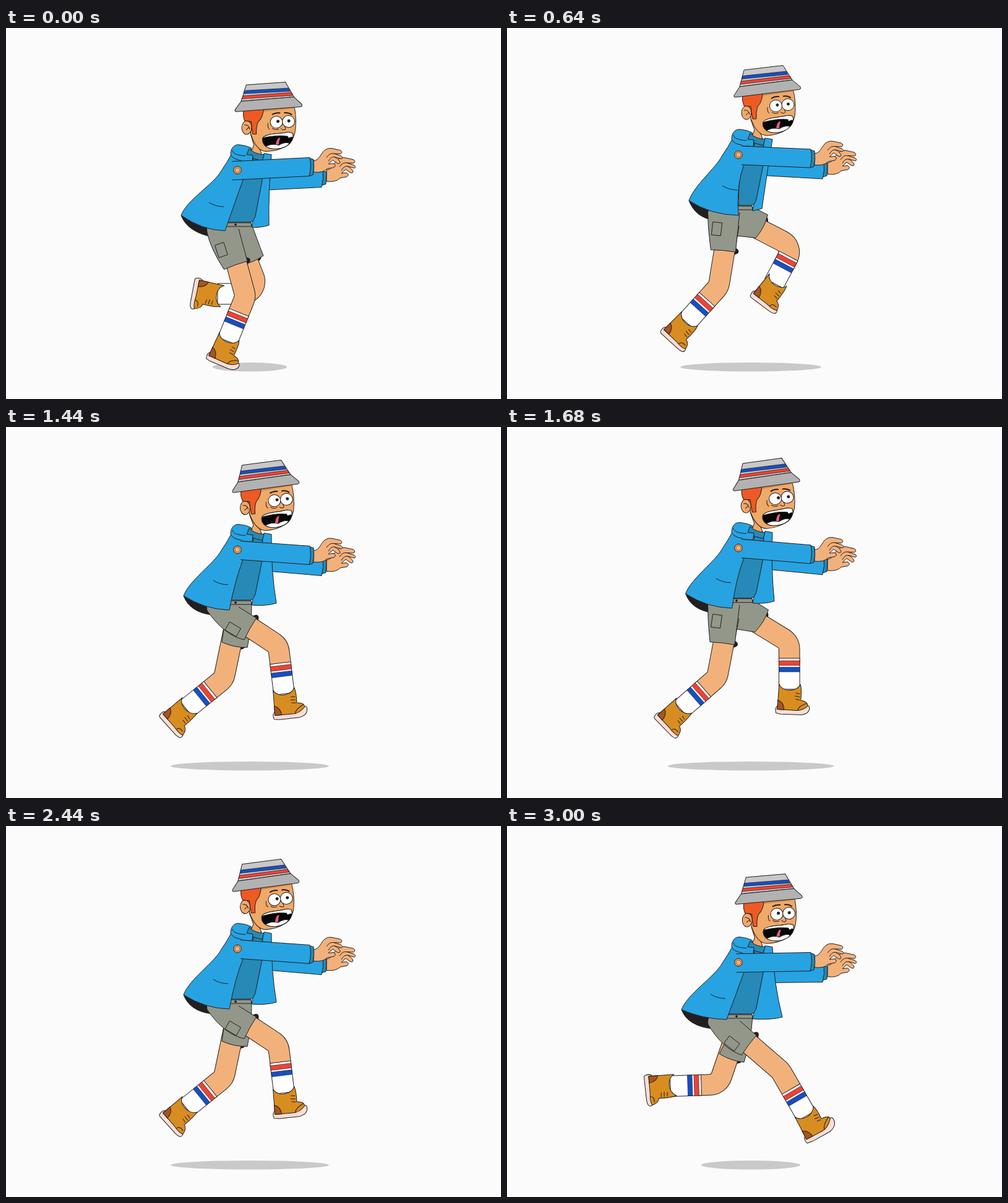
Animation of 800 by 600 pixels, one loop 3.04 s. Source, as an HTML page with a canvas:

```html
<!DOCTYPE html>
<html lang="en">
<head>
<meta charset="utf-8">
<title>Running man</title>
<style>
html, body { margin: 0; width: 100%; height: 100%; overflow: hidden; background: #fbfbfb; }
canvas { display: block; width: 800px; height: 600px; }
</style>
</head>
<body>
<canvas id="stage" width="800" height="600"></canvas>
<script>
const ctx = document.getElementById('stage').getContext('2d');
const LOOP = 3040, STEP = 40, STRIDE = 12.5;
const INK = '#231f20', BLUE = '#27a3e2', TEAL = '#2789b7', SKIN = '#f2b17b', FACE = '#efa969',
  CLOTH = '#92978a', RED = '#ee4236', ROYAL = '#174fc0', SHOE = '#d88d20', SOLE = '#f6ded6';

// phase, knee x, knee y (from the hip), shin angle, foot angle, shin length, toe lift
const LEG = [
  [0, 27, 99, -22, 0, 1, .6],
  [.2, -18, 110, -42, 0, 1, 0],
  [.3, -22, 106, -51, -4, 1, 0],
  [.34, -35, 100, -60, 0, 1, 0],
  [.38, -51, 92, -75, -2, 1, 0],
  [.42, -32, 93, -88, -5, 1, 0],
  [.5, 37, 95, -90, 10, .88, 0],
  [.7, 89, 46, -28, 8, .85, 0],
  [.8, 80, 53, 7, 0, 1, .8],
  [.84, 80, 62, 19, 0, 1, 1],
  [.92, 82, 71, 30, 0, 1.08, 1]
];
// phase, drop of the body
const BOB = [[0, 27], [.04, 27], [.12, 17], [.2, 0], [.27, -10.5], [.3, -7], [.34, 0], [.42, 17]];
// phase, back hem x, y, front hem x, y, far flap x
const COAT = [
  [0, 283, 276, 354, 301, 425],
  [.2, 294, 279, 374, 303, 412],
  [.3, 287, 280, 361, 303, 437],
  [.34, 285, 280, 360, 300, 439],
  [.42, 282, 280, 355, 296, 445]
];

// Smooth periodic curve through the keys
function curve(keys, period, phase) {
  const n = keys.length;
  const p = ((phase % period) + period) % period;
  const at = i => keys[(i + n) % n];
  const time = i => at(i)[0] + Math.floor(i / n) * period;
  let i = n - 1;
  while (keys[i][0] > p) i--;
  const h = time(i + 1) - time(i), s = (p - time(i)) / h;
  const slope = (j, k) => (at(j + 1)[k] - at(j - 1)[k]) / (time(j + 1) - time(j - 1));
  return at(i).slice(1).map((a, c) => {
    const k = c + 1, b = at(i + 1)[k], d = b - a;
    const m0 = slope(i, k) * h, m1 = slope(i + 1, k) * h;
    return a + s * (m0 + s * (3 * d - 2 * m0 - m1 + s * (m0 + m1 - 2 * d)));
  });
}

function shape(d, fill, stroke = INK, width = 1) {
  const path = new Path2D(d);
  if (fill) { ctx.fillStyle = fill; ctx.fill(path); }
  if (stroke) { ctx.strokeStyle = stroke; ctx.lineWidth = width; ctx.stroke(path); }
}
const line = (d, width) => shape(d, null, INK, width);

function oval(x, y, rx, ry, fill, stroke = INK, tilt = 0) {
  ctx.beginPath();
  ctx.ellipse(x, y, rx, ry, tilt, 0, 2 * Math.PI);
  ctx.fillStyle = fill;
  ctx.fill();
  if (stroke) { ctx.strokeStyle = stroke; ctx.lineWidth = 1; ctx.stroke(); }
}

function group(draw) {
  ctx.save();
  draw();
  ctx.restore();
}

function pose(phase, x, y) {
  const [kx, ky, shin, foot, len, toe] = curve(LEG, 1, phase);
  const r = Math.hypot(kx, ky), u = [kx / r, ky / r], n = [u[1], -u[0]];
  const on = (a, b) => [x + a * u[0] + b * n[0], y + a * u[1] + b * n[1]];
  const hem = 54 - .13 * Math.max(0, kx);
  return { x, y, knee: [x + kx, y + ky], shin: shin * Math.PI / 180, foot: foot * Math.PI / 180, len, toe, hem, on, n };
}

function shoe(toe) {
  const tx = 28 + 6 * toe, ty = 36 - 10 * toe;
  shape(`M-18 30 Q-24 33 -21 42 L${-19 + 8 * toe} 43.500 L${18 + 2 * toe} 44 Q${tx + 2} ${44 - 3 * toe} ${tx + 1} ${ty + 2}
    Q${tx} ${ty - 2} ${tx - 5} ${ty} Z`, SOLE);
  shape(`M-17 -5 C-12 8 11 8 17.500 -5 Q20 4 18.500 ${24 - 5 * toe} Q${tx - 2} ${25 - 5 * toe} ${tx - 3 * toe} ${ty}
    Q${22 - 2 * toe} ${39 - toe} 9 37 L-19 36 Q-18 14 -17 -5 Z`, SHOE);
  shape('M-18.500 21 Q-9 24 -8 36.500 L-19 36 Z', '#a8551b');
  line(`M14 37 Q15 30 ${tx - 4} ${ty - 4}`);
  line('M10 9 L17 10 M9 14 L17 15 M10 19 L17 20');
}

function leg(p) {
  const [kx, ky] = p.knee, dx = Math.sin(p.shin), dy = Math.cos(p.shin);
  const hem = p.on(p.hem - 3, 3);
  oval(hem[0], hem[1], 20, 8, INK, null, Math.atan2(p.n[1], p.n[0]));
  for (const [color, width] of [[INK, 34.6], [SKIN, 32.6]]) {
    ctx.beginPath();
    ctx.moveTo(p.x, p.y);
    ctx.arcTo(kx, ky, kx + 34 * dx, ky + 34 * dy, 20);
    ctx.lineTo(kx + 34 * dx, ky + 34 * dy);
    ctx.strokeStyle = color;
    ctx.lineWidth = width;
    ctx.stroke();
  }
  group(() => {
    ctx.translate(kx, ky);
    ctx.rotate(-p.shin);
    ctx.translate(0, 75 * (p.len - 1));
    shape('M-16.8 28 H16.8 V78 H-16.8 Z', '#fff');
    shape('M-16.8 32 H16.8 V39.5 H-16.8 Z', RED, INK, .6);
    shape('M-16.8 42.5 H16.8 V50 H-16.8 Z', ROYAL, INK, .6);
    ctx.translate(0, 90);
    ctx.rotate(p.foot);
    ctx.translate(0, -15);
    shoe(p.toe);
  });
}

function farShorts(p) {
  const y = p.y, back = p.on(p.hem - 3, -15), front = p.on(p.hem - 3, 27);
  shape(`M340 ${y - 18} L352 ${y + 26} L${back} Q${p.on(p.hem + 2, 6)} ${front}
    Q${p.on(16, 27)} 397 ${y - 18} Z`, CLOTH);
}

function nearShorts(p) {
  const y = p.y, back = p.on(p.hem + 1, -22), front = p.on(p.hem - 2, 18);
  shape(`M333 ${y - 22} H397 L390 ${y + 8} L375 ${y + 12} Z`, CLOTH, null);
  shape(`M333 ${y - 24} Q322 ${y - 14} 325 ${y - 4} Q${p.on(14, -34)} ${back}
    Q${p.on(p.hem - 2, -2)} ${front} L376 ${y - 10}`, CLOTH);
  line(`M${p.on(10, -26)} L${p.on(9, -11)} L${p.on(30, -10)} L${p.on(31, -25)} Z`);
  shape(`M345 ${y - 20} H396 L397 ${y - 14} H345 Z`, CLOTH);
  oval(371, y - 17, 1.4, 1.4, INK);
}

function hand(x, y) {
  group(() => {
    ctx.translate(x, y);
    shape(`M497 203 C506 203 509 191 515 186 Q520 182 526 183 L540 186 Q545 189 541 192 L530 191.500
      L541 195 Q546 198 542 200 L531 197 Q539 201 540 206 Q539 209 535 207 L528 202 L521 208.500
      L529 207.500 Q535 210 530 214 L519 216 Q513 223 497 221.500 Z`, SKIN);
    line('M518 198 Q523 190 530 191.500 M521 204 Q525 196 531 197');
  });
}

function farArm(up, dy) {
  const w = dy * .5;
  hand(21, 15 + dy * .43);
  shape(`M511 ${218 + w} L518 ${219 + w} L517 ${239 + w} L510 ${241 + w} Z`, TEAL);
  shape(`M405 ${208 + up} L512 ${216 + w} Q514 ${230 + w} 510 ${244 + w} L405 ${238 + up} Z`, BLUE);
}

function nearArm(up, dy) {
  const w = dy * .5, x = 379 - Math.max(0, dy) * .5;
  hand(0, dy * .43);
  shape(`M490 ${197 + w} L497 ${199 + w} Q499 ${212 + w} 496 ${224 + w} L490 ${226 + w} Z`, TEAL);
  const top = `${x} ${191 + up} L491 ${196 + w}`;
  const low = `490 ${226 + w} L${x} ${221 + up}`;
  shape(`M${top} Q494 ${211 + w} ${low} Z`, BLUE, null);
  line(`M${top} Q494 ${211 + w} ${low}`);
  oval(374, 205 + up, 6.3, 6.3, '#f3a764');
  oval(374, 205 + up, 4, 4, '#f5b57c', '#a8551b');
}

function lining(c, dy) {
  const [bx, by] = c;
  shape(`M${bx} ${by + dy} Q${bx + 10} ${by + dy + 27} 334 ${311 + dy} L350 ${300 + dy} Z`, INK);
}

function coat(c, up, dy) {
  const [bx, by, hx, hy, fx] = c;
  shape(`M414 ${182 + up} L417 ${178 + up} L429 ${180 + up} Q${429 + (fx - 439) * .35} ${240 + up} ${fx} ${292 + dy}
    Q${fx - 18} ${297 + dy} 397 ${295 + dy} L408 ${240 + up} Z`, BLUE);
  shape(`M390 ${178 + up} L415 ${182 + up} L414 ${222 + up} L403 ${277 + dy} Q400 ${287 + dy} 394 ${287 + dy}
    H${hx} L376 ${220 + up} Z`, TEAL);
  shape(`M365 ${178 + up} L398 ${188 + up} L383 ${221 + up} Q370 ${255 + dy} ${hx} ${hy + dy}
    Q${bx + 34} ${hy + dy - 1} ${bx} ${by + dy} C${bx + 9} ${by + dy - 25} 337 ${227 + up} 348 ${206 + up}
    Q357 ${193 + up} 365 ${178 + up} Z`, BLUE);
  const px = hx - 26;
  line(`M${px} ${255 + dy} Q${px + 11} ${262 + dy} ${px + 24} ${262 + dy}`);
}

function hood(up) {
  group(() => {
    ctx.translate(0, up);
    shape('M363 180 C363 168 370 163 377 164 Q388 165 396 169 L400 190 Q369 192 363 180 Z', BLUE);
    line('M366 173 C367 182 386 182 397 182');
  });
}

function collar(up) {
  group(() => {
    ctx.translate(0, up);
    shape('M393 170 Q401 179 417 180 L414 190 Q401 188 389 180 Z', TEAL);
    shape('M389 180 L399 181 L398 191 L380 190 Z', BLUE, null);
    line('M389 180 L399 181 L398 191');
  });
}

function mouth() {
  const lips = 'M414 152 C419 145 436 145 448 142.500 Q457 140 462 143 Q464 152 458 159 C449 170 426 173 417 164 Q412 158 414 152 Z';
  shape(lips, '#060606');
  group(() => {
    ctx.clip(new Path2D(lips));
    shape('M412 153 Q436 146 454 148 L455 151 L460 149 L464 150 V138 H412 Z', '#fff');
    shape('M418 167 Q428 160 440 163 Q449 157 457 159 L448 174 H418 Z', '#fff');
    shape('M435 162 Q437 150 442 151 Q440 156 440 162 Z', '#ea5f86', null);
  });
  line(lips);
}

function head(up, dy) {
  group(() => {
    ctx.translate(405, 180 + up);
    ctx.rotate(dy * .1 * Math.PI / 180);
    ctx.translate(-405, -180);
    shape('M394 148 L400 165 L396 175 Q403 181 413 179 L411 173 Z', FACE);
    shape('M390 104 L462 98 Q468 122 465 143 C461 161 447 172 420 174 Q404 174 394 147 Z', FACE);
    shape('M411 106 L463 99 L464 102 L412 110 Z', '#cf8a4c', null);
    oval(387, 137, 8, 11, FACE);
    line('M383 133 Q391 132 392 140 M386 141 L391 136');
    shape('M381 108 L413 104 Q413 119 405 127 Q402 135 403 147 L397 147 Q395 137 394 127 L383 126 Q379 117 381 108 Z', '#ee5a24');
    oval(434.5, 126, 10, 9.6, '#fff');
    oval(454, 124, 10, 9.6, '#fff');
    const look = Math.max(0, -dy) * .25;
    oval(437 + look, 124.500, 2, 2, INK);
    oval(454.5 + look * .5, 123, 2, 2, INK);
    line('M427 114 Q433 110 440 111 M446 110.500 Q453 109 459 113', 2);
    line('M448 132 Q452 138 446 138 L442 136 M421 128 Q420 135 424 138 M428 136 Q433 140 439 137');
    mouth();
    shape('M383 68 L446 60.500 L461 84 L376 95 Z', '#c8c8c8');
    shape('M380.500 77.500 L451 70 L454 75 L379.500 82.500 Z', ROYAL, INK, .7);
    shape('M378.500 86 L456 77 L459 81.500 L377 91 Z', RED, INK, .7);
    shape('M376 95 L461 84 L474 95 Q476 99 472 99.500 L369 112 Q366 112 367 109 Z', '#b2b2b2');
  });
}

function draw(phase) {
  const [dy] = curve(BOB, .5, phase), c = curve(COAT, .5, phase);
  const up = dy * .92;
  const near = pose(phase, 360, 308 + dy), far = pose(phase + .5, 374, 308 + dy);
  ctx.fillStyle = '#fbfbfb';
  ctx.fillRect(0, 0, 800, 600);
  oval(394, 548.3, 114 - 2 * dy, 7.3, '#c9c9c9', null);
  leg(far);
  farShorts(far);
  farArm(up, dy);
  lining(c, dy);
  leg(near);
  nearShorts(near);
  coat(c, up, dy);
  hood(up);
  head(up, dy);
  collar(up);
  nearArm(up, dy);
}

// The first pose is held twice as long as the others
function tick(now) {
  const elapsed = Math.max(0, now - start) % LOOP;
  draw(Math.max(0, Math.floor(elapsed / STEP) - 1) / STRIDE);
  requestAnimationFrame(tick);
}
ctx.lineCap = 'butt';
ctx.lineJoin = 'round';
const start = performance.now();
tick(start);
</script>
</body>
</html>
```
